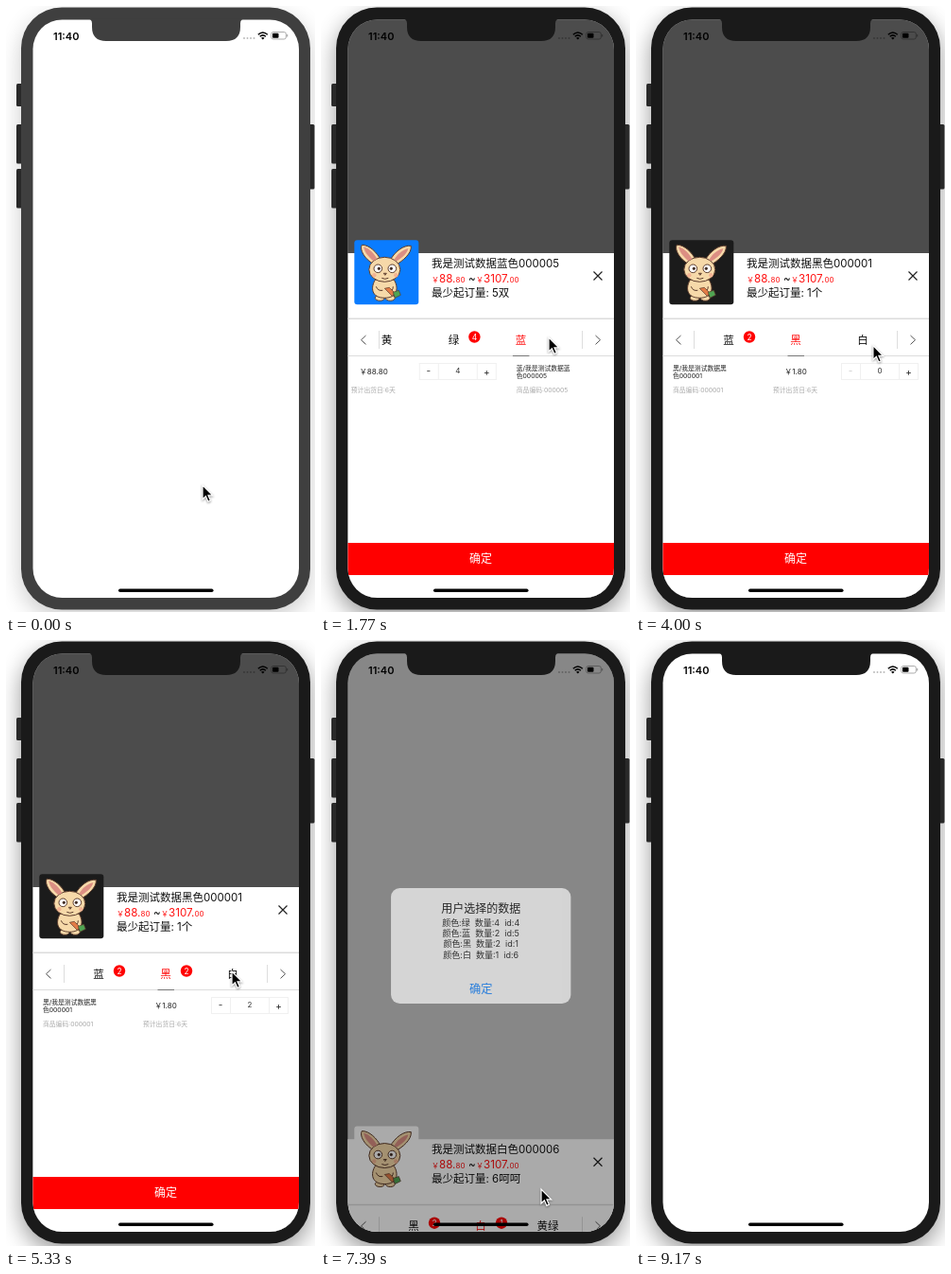
Animation, 327 px wide and 640 px high, one loop 9.27 s. Source, as an HTML page:

```html
<!DOCTYPE html>
<html lang="zh-CN">
<head>
<meta charset="utf-8">
<title>选择规格</title>
<style>
html, body { margin: 0; width: 100%; height: 100%; overflow: hidden; background: #fff; }
svg { display: block; width: 327px; height: 640px; }
text { font-family: Inter, "Noto Sans CJK SC", "Noto Sans CJK", "Noto Sans CJK JP", sans-serif; white-space: pre; }
</style>
</head>
<body>
<svg viewBox="0 0 327 640">
  <defs>
    <filter id="soft" x="-20%" y="-20%" width="140%" height="140%"><feGaussianBlur stdDeviation="12"/></filter>
    <clipPath id="screen"><rect x="28.5" y="14.5" width="281.5" height="610.5" rx="31"/></clipPath>
    <clipPath id="tabs"><rect x="62" y="70" width="214" height="40"/></clipPath>
    <g id="rabbit" stroke="#5b3b2c" stroke-width="1" stroke-linejoin="round">
      <g fill="#f6d9a9">
        <path d="M20 25C11 20 5 10 8 5c8 0 16 8 20 16z"/>
        <path d="M38 21C43 12 52 5 60 6c1 8-9 16-16 20z"/>
        <ellipse cx="27" cy="61" rx="5" ry="3"/><ellipse cx="38" cy="61" rx="5" ry="3"/>
        <path d="M22 42C17 50 18 61 32 61S47 50 42 42z"/>
        <ellipse cx="32" cy="31" rx="16.5" ry="13"/>
      </g>
      <g stroke="none" fill="#dc8f83">
        <path d="M20 22C14 17 10 11 10 7c6 2 11 7 14 13z"/>
        <path d="M42 21c3-6 9-11 15-12-1 5-6 9-12 13z"/>
        <circle cx="21" cy="37" r="2.2" fill="#f3b393"/><circle cx="44" cy="37" r="2.2" fill="#f3b393"/>
      </g>
      <circle cx="25" cy="30" r="4.3" fill="#fff"/><circle cx="40" cy="30" r="4.3" fill="#fff"/>
      <circle cx="26" cy="30" r="1.2" fill="#222"/><circle cx="39" cy="30" r="1.2" fill="#222"/>
      <path d="M31 35h3l-1.5 2zM29 40q3.5 2 7 0M23 49q2 5 7 4M41 49q0 5-5 5" fill="none"/>
      <path d="M32 51l5-1 6 6-3 3z" fill="#e27b46" stroke-width=".7"/>
      <path d="M41 55l6-2 2 5-6 3z" fill="#4fa553" stroke-width=".7"/>
    </g>
  </defs>
  <g id="stage"></g>
</svg>
<script>
const LOOP = 9270, BEAT = 147.9, TAB_W = 71, PAGE_W = 281;
const stage = document.getElementById('stage');

const items = [
  { name: '黄' },
  { name: '绿', id: 4, unit: '只', price: '88.80', bg: '#5f0', clicks: [0, 0, 0, 0] },
  { name: '蓝', id: 5, unit: '双', price: '88.80', bg: '#0a7cff', clicks: [19, 20] },
  { name: '黑', id: 1, unit: '个', price: '1.80', bg: '#1b1b1b', clicks: [30, 31] },
  { name: '白', id: 6, unit: '呵呵', price: '88.80', bg: '#fff', clicks: [42] },
  { name: '黄绿' }
];
const picks = [12, 25, 37]; // beats at which the next tab is tapped

// pointer stops: beat, x, y
const stops = [
  [0, 208, 506], [2, 208, 506], [5, 205, 509], [9, 236, 368], [10, 240, 352], [12, 241, 350],
  [18, 285, 383], [21, 285, 383], [24, 239, 350], [26, 239, 350], [29, 285, 383], [33, 285, 383],
  [36, 239, 350], [38, 239, 350], [41, 285, 383], [43, 285, 383], [47, 233, 580], [51, 233, 580],
  [56, 172, 365], [59, 172, 365], [62, 176, 650]
];

const clamp = v => Math.max(0, Math.min(1, v));
const easeOut = (b, start, len) => 1 - (1 - clamp((b - start) / len)) ** 2;
const count = (item, b) => item.clicks ? item.clicks.filter(c => b >= c).length : 0;
const code = item => '00000' + item.id;

const rect = (x, y, w, h, fill, more = '') =>
  `<rect x="${x}" y="${y}" width="${w}" height="${h}" fill="${fill}" ${more}/>`;
const line = (d, color, width = 1) =>
  `<path d="${d}" fill="none" stroke="${color}" stroke-width="${width}"/>`;
// y is the middle of the glyphs
const text = (x, y, str, size, fill = '#111', more = '') =>
  `<text x="${x}" y="${y + size * .37}" font-size="${size}" fill="${fill}" ${more}>${str}</text>`;
const mid = (x, y, str, size, fill, more = '') =>
  text(x, y, str, size, fill, 'text-anchor="middle" ' + more);
const group = (content, attrs) => `<g ${attrs}>${content}</g>`;

function pointer(b) {
  const i = Math.max(1, stops.findIndex(s => s[0] >= b));
  const [b0, x0, y0] = stops[i - 1], [b1, x1, y1] = stops[i];
  const p = clamp((b - b0) / (b1 - b0)), e = p * p * (3 - 2 * p);
  return `<path transform="translate(${x0 + (x1 - x0) * e} ${y0 + (y1 - y0) * e})"
    d="M0 0V15l3.4-3.2 2.5 5.6 2.5-1.1-2.4-5.4H10.700z" stroke="#fff" stroke-width="1.2"
    style="filter:drop-shadow(0 1px 1px #0006)"/>`;
}

function device(color, shade) {
  return rect(16, 10, 306, 636, '#000', `rx="43" opacity="${shade}" filter="url(#soft)"`) +
    [[11, 82, 24], [11, 125, 41.5], [11, 172, 41.5], [318, 125, 68.5]]
      .map(([x, y, h]) => rect(x, y, 8.500, h, '#292929', 'rx="1.5"')).join('') +
    rect(16, 1.5, 306, 636, color, 'rx="43"');
}

function statusBar() {
  return text(50, 31.5, '11:40', 11, '#000', 'font-weight="600"') +
    [252, 255.5, 259, 262.5].map(x => `<circle cx="${x}" cy="34" r="1" fill="#bbb"/>`).join('') +
    line('M266.800 30.300q5-4.600 10 0M268.700 32.300q3.100-2.800 6.200 0', '#000', 1.5) +
    '<path d="M270 33.700q1.800-1.500 3.600 0l-1.800 1.900z"/>' +
    rect(280.8, 27.5, 15.5, 7.5, 'none', 'rx="2" stroke="#999" stroke-width=".8"') +
    rect(282, 28.700, 6.500, 5.100, '#000', 'rx="1"') + rect(297.2, 30, 1, 2.500, '#999');
}

function priceRange() {
  const part = (str, size, more = '') => `<tspan font-size="${size}" ${more}>${str}</tspan>`;
  return `<text y="31" fill="#f11">` +
    part('￥', 8, 'x="117"') + part('88.', 11.6) + part('80', 8) +
    part('~', 11.6, 'x="156" fill="#111"') +
    part('￥', 8, 'x="164"') + part('3107.', 11.6) + part('00', 8) + '</text>';
}

function page(item, n) {
  const faint = n ? '#333' : '#ccc';
  return text(39, 121, `${item.name}/我是测试数据${item.name}`, 6.8, '#222') +
    text(39, 129, '色' + code(item), 6.8, '#222') +
    mid(169, 125, '￥' + item.price, 8, '#222') +
    text(39, 144, '商品编码:' + code(item), 6.8, '#aaa') +
    text(145, 144, '预计出货日:6天', 6.8, '#aaa') +
    line('M217 116.500H299M217 133.500H299M217.500 116V134M237.500 116V134M278.500 116V134M298.500 116V134', '#f0f0f0') +
    mid(227, 124.500, '-', 10, faint) + mid(258, 124.500, n, 8, '#333') + mid(288.5, 125, '+', 10, '#222');
}

function tab(item, i, sel, scroll, b) {
  const x = 169 + (i - scroll) * TAB_W, n = count(item, b);
  return mid(x, 92, item.name, 11.5, i === sel ? '#f11' : '#111') +
    (n ? `<circle cx="${x + 22}" cy="88.500" r="6.200" fill="#f00"/>` + mid(x + 22, 88.500, n, 8.5, '#fff') : '');
}

function sheet(b, top) {
  const sel = 1 + picks.filter(p => b >= p).length;
  const scroll = 1 + picks.reduce((sum, p) => sum + easeOut(b, p - .5, 2.2), 0);
  const item = items[sel];
  const pages = items.map((it, i) => it.id && Math.abs(i - scroll) < 1
    ? group(page(it, count(it, b)), `transform="translate(${(i - scroll) * PAGE_W} 0)"`) : '').join('');
  const bar = 160.5 + (sel - scroll) * TAB_W;
  return group(
    rect(28, 0, 283, 400, '#fff') +
    group(rect(0, 0, 68, 68, item.bg, 'rx="3"') + '<use href="#rabbit"/>', 'transform="translate(35.300 -13.700)"') +
    text(117, 10.500, `我是测试数据${item.name}色${code(item)}`, 11.5) +
    priceRange() +
    text(117, 42, `最少起订量: ${item.id}${item.unit}`, 11.5) +
    line('M288.500 19.500l9 9m0-9l-9 9', '#222', 1.2) +
    rect(28, 68.500, 283, 1.5, '#dcdcdc') +
    line('M47.500 87l-5 4.700 5 4.700M290.500 87l5 4.700-5 4.700', '#555') +
    line('M61.500 82V101M276.500 82V101M28 108.500H311', '#ddd') +
    group(items.map((it, i) => tab(it, i, sel, scroll, b)).join('') +
      rect(bar, 108, 17.5, 1, sel === 1 ? '#f11' : '#777'), 'clip-path="url(#tabs)"') +
    pages +
    rect(28, 306, 283, 34, b === 48 ? '#8b0000' : '#f00') +
    mid(169, 323, '确定', 12, '#fff'),
    `transform="translate(0 ${top})"`);
}

function alertBox(show, scale, pressed) {
  const rows = items.filter(it => it.id).map((it, i) =>
    mid(0, -23.500 + 10.8 * i, `颜色:${it.name}  数量:${it.clicks.length}  id:${it.id}`, 8.7, '#111')).join('');
  return rect(28, 14, 283, 612, '#000', `opacity="${.4 * Math.sqrt(show)}"`) +
    group(rect(-92, -59, 184, 118, '#f6f6f6', 'rx="9"') +
      (pressed ? '<path d="M-92 29H92V50a9 9 0 0 1-9 9H-83a9 9 0 0 1-9-9z" fill="#ddd"/>' : '') +
      mid(0, -38.600, '用户选择的数据', 11.6, '#000', 'font-weight="500"') + rows +
      mid(0, 43.500, '确定', 11.8, '#007aff', 'font-weight="500"'),
      `transform="translate(169.200 323) scale(${scale})" opacity="${show}"`);
}

function draw(b) {
  const active = b >= 2, color = active ? '#1a1a1a' : '#3f3f3f';
  const open = easeOut(b, 3.3, 2.08) - easeOut(b, 49, 2.2);
  const rise = easeOut(b, 49, 2.2), show = rise - easeOut(b, 58.5, 2.2);
  stage.innerHTML = device(color, active ? .4 : .2) +
    group(rect(28, 14, 283, 612, '#fff') + statusBar() +
      (open > 0 ? rect(28, 14, 283, 612, '#000', `opacity="${.7 * open}"`) + sheet(b, 640 - 379 * open) : '') +
      (show > 0 ? alertBox(show, 1 + .115 * (1 - rise), b === 58) : ''),
      'clip-path="url(#screen)"') +
    `<path d="M86 13.500q5 0 5 5v3.500q0 15 15 15h127q15 0 15-15v-3.500q0-5 5-5z" fill="${color}"/>` +
    rect(119, 615.500, 100.500, 3.500, '#000', 'rx="1.75"') +
    pointer(b);
}

let last = -1;
function tick() {
  const beat = Math.floor((performance.now() % LOOP + 5) / BEAT);
  if (beat !== last) draw(last = beat);
  requestAnimationFrame(tick);
}
tick();
</script>
</body>
</html>
```
